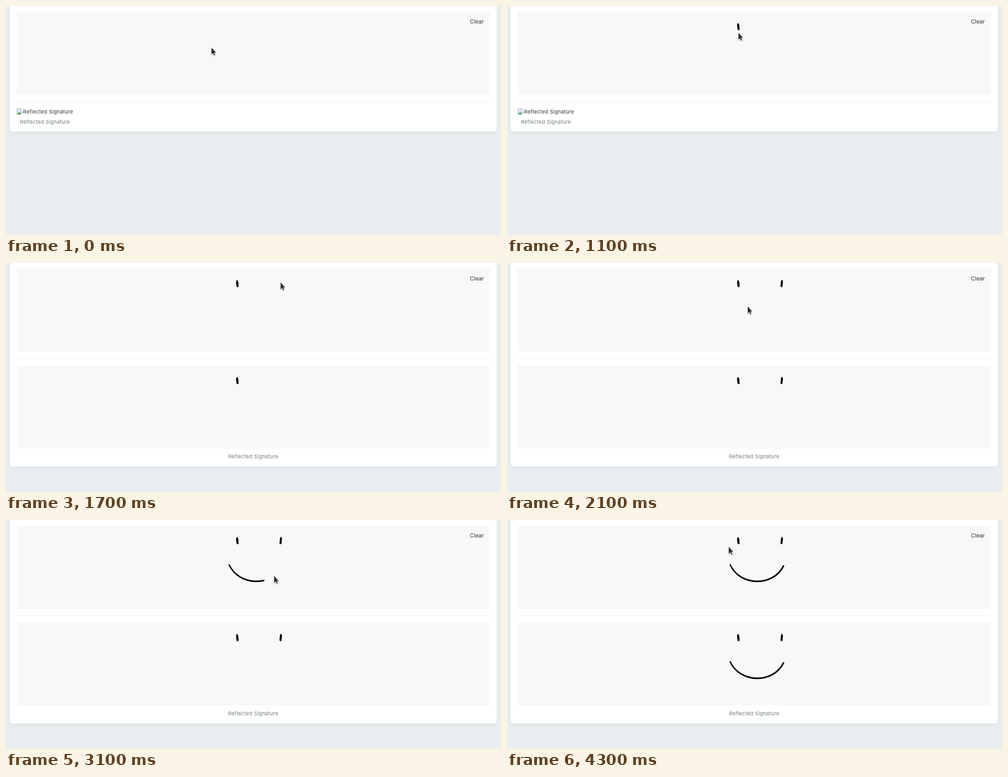
Recreate the animation shown at these times as an HTML page. Size 1067x496 px, loop 5 s.

```html
<!DOCTYPE html>
<html lang="en">
<head>
<meta charset="utf-8">
<title>Signature pad</title>
<style>
  html, body { margin: 0; width: 100%; height: 100%; overflow: hidden; background: #e8eef0; }
  svg { display: block; position: fixed; left: 0; top: 0; }
  text { font: 11px Inter, sans-serif; letter-spacing: .3px; fill: #333; }
  .clear { font-size: 12px; letter-spacing: 0; }
  .caption { fill: #6b7a80; }
  .card { fill: #fff; filter: drop-shadow(0 2px 3px rgba(0, 0, 0, .05)); }
  .pad { fill: #f8f8f8; }
  .ink { stroke: #000; stroke-linecap: round; }
  .cursor { filter: drop-shadow(.5px 1px 1px rgba(0, 0, 0, .3)); }
</style>
</head>
<body>
<svg width="1067" height="496" viewBox="0 0 1067 496">
  <rect id="card" class="card" x="8" y="-20" width="1050" height="292" rx="6"/>
  <rect class="pad" x="23" y="12" width="1020" height="180"/>
  <text class="clear" x="1000" y="38">Clear</text>
  <rect x="23" y="207" width="1020" height="1" fill="#ececec"/>

  <g id="empty">
    <svg x="23" y="222" width="14" height="14">
      <path d="M.5 .5H11L15 4.5V15H.5Z" fill="#fff" stroke="#a3a3a3"/>
      <path d="M2 2H10V6H14V9L9 13H2Z" fill="#c3d5f5"/>
      <path d="M2 13V11Q5 6.5 9 10.5L7 13Z" fill="#58a846"/>
      <ellipse cx="5" cy="5" rx="2" ry="1.2" fill="#fff"/>
      <path d="M7 14L14 7V14Z" fill="#fff"/>
      <path d="M7 14L14 7" stroke="#a3a3a3"/>
    </svg>
    <text x="37" y="233">Reflected Signature</text>
    <text class="caption" x="30" y="255">Reflected Signature</text>
  </g>

  <g id="mirror">
    <rect class="pad" x="23" y="222" width="1020" height="180"/>
    <text class="caption" x="533" y="423" text-anchor="middle">Reflected Signature</text>
  </g>

  <g id="drawing" class="ink"></g>
  <g id="reflection" class="ink" transform="translate(0 210)"></g>

  <g id="cursor" class="cursor">
    <path d="M0 0V15L3.3 12L5.7 17L7.7 16.1L5.5 11.1H9.5Z"
      fill="#2b2b2b" stroke="#fff" stroke-width="1.6" stroke-linejoin="round" paint-order="stroke"/>
  </g>
</svg>
<script>
const LOOP = 5000, TICK = 100;
const PEN_LAG = 1.2;   // ticks the ink trails behind the pointer
const COPY_DELAY = 2;  // ticks from pen up to the reflected stroke
const SEGMENTS = 16;

const $ = id => document.getElementById(id);
const show = (el, on) => el.setAttribute("visibility", on ? "visible" : "hidden");
const ease = k => k * k * (3 - 2 * k);

function make(tag, attrs) {
  const el = document.createElementNS("http://www.w3.org/2000/svg", tag);
  for (const key in attrs) el.setAttribute(key, attrs[key]);
  return el;
}

// The ink starts thin and reaches its full width a third of the way along.
function makeStroke(d, thin, thick, times) {
  const path = make("path", { d });
  const length = path.getTotalLength();
  const at = u => path.getPointAtLength(u * length);
  const ink = make("g"), copy = make("g");
  for (let i = 0; i < SEGMENTS; i++) {
    const a = at(i / SEGMENTS), b = at((i + 1) / SEGMENTS);
    const width = thin + (thick - thin) * Math.min(1, 3 * i / SEGMENTS);
    const line = make("line", { x1: a.x, y1: a.y, x2: b.x, y2: b.y, "stroke-width": width });
    ink.append(line);
    copy.append(line.cloneNode());
  }
  $("drawing").append(ink);
  $("reflection").append(copy);
  return { at, ink, copy, ...times };
}

const strokes = [
  makeStroke("M498 38.5L499.2 50.3", 2.6, 4.4, { arrive: 6, down: 8, up: 10 }),
  makeStroke("M592.8 38L591.7 50.3", 2.6, 4.2, { arrive: 14, down: 16, up: 19 }),
  makeStroke("M481 97C503 144.5 574 144.5 596 99.5", 2.8, 3.4, { arrive: 24, down: 25, up: 32.5 })
];

// Pointer stops between strokes, joined with the ends of each stroke
const stops = [
  { t: 0, x: 443, y: 90 },
  { t: 11, x: 499, y: 58 },
  { t: 12, x: 520, y: 60 },
  { t: 20, x: 585, y: 64 },
  { t: 21, x: 519, y: 94 },
  { t: 35, x: 596, y: 97 },
  { t: 38, x: 591, y: 193 },
  { t: 40, x: 632, y: 205 },
  { t: 41, x: 632, y: 205 },
  { t: 43, x: 478, y: 58 }
];
for (const { at, arrive, down, up } of strokes) {
  for (const [t, u] of [[arrive, 0], [down, 0], [up, 1]]) {
    const { x, y } = at(u);
    stops.push({ t, x, y });
  }
}
stops.sort((a, b) => a.t - b.t);

function pointerAt(tick) {
  const active = strokes.find(s => tick >= s.down && tick <= s.up);
  if (active) return active.at((tick - active.down) / (active.up - active.down));
  const next = stops.findIndex(stop => stop.t > tick);
  if (next < 0) return stops[stops.length - 1];
  const a = stops[next - 1], b = stops[next];
  const k = ease((tick - a.t) / (b.t - a.t));
  return { x: a.x + (b.x - a.x) * k, y: a.y + (b.y - a.y) * k };
}

function draw(time) {
  const tick = Math.floor(time % LOOP / TICK);
  const copied = ({ up }) => tick >= Math.ceil(up) + COPY_DELAY;
  const signed = copied(strokes[0]);
  $("card").setAttribute("height", signed ? 461 : 292);
  show($("empty"), !signed);
  show($("mirror"), signed);
  for (const stroke of strokes) {
    const { down, up, ink, copy } = stroke;
    const drawn = tick >= up ? 1 : (tick - PEN_LAG - down) / (up - down);
    [...ink.children].forEach((line, i) => show(line, i < Math.round(drawn * SEGMENTS)));
    show(copy, copied(stroke));
  }
  const { x, y } = pointerAt(tick);
  $("cursor").setAttribute("transform", `translate(${Math.round(x)} ${Math.round(y)})`);
}

const began = performance.now();
function frame() {
  draw(performance.now() - began);
  requestAnimationFrame(frame);
}
frame();
</script>
</body>
</html>
```
